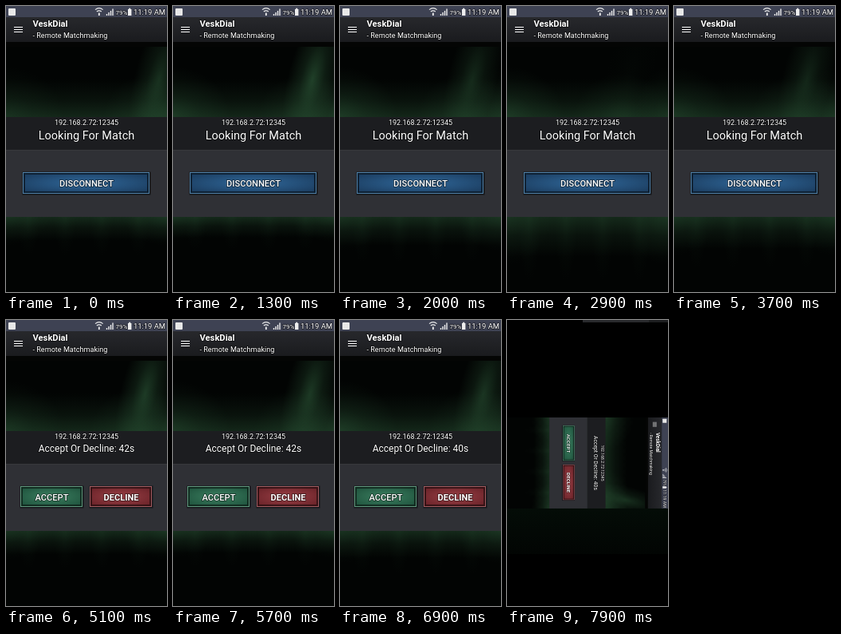
Animation, 202 px wide and 358 px high, one loop 8 s. Source, as an HTML page with a canvas:

```html
<!DOCTYPE html>
<html lang="en">
<head>
<meta charset="utf-8">
<title>Remote matchmaking</title>
<style>
html, body { margin: 0; width: 100%; height: 100%; overflow: hidden; background: #000; }
#stage { position: relative; width: 202px; height: 358px; overflow: hidden; background: #000; }
#phone { position: absolute; left: 0; top: 0; width: 202px; height: 358px; transform-origin: 0 0; background: #000; }
#phone > * { position: absolute; left: 0; top: 0; display: block; }
#phone.turned { transform: matrix(0, .564, -.564, 0, 202, 122); }
#rest { position: absolute; inset: 0; display: none; }
#rest.on { display: block; }
#rest i { position: absolute; }
text {
  font-family: Roboto, "Liberation Sans", sans-serif; fill: #fff;
  stroke: rgba(0, 0, 0, .55); stroke-width: 1.6px; paint-order: stroke;
}
.mid { text-anchor: middle; }
.label { font-size: 11.1px; font-weight: 500; text-anchor: middle; }
</style>
</head>
<body>
<div id="stage">
  <div id="rest">
    <i style="left:95px;top:0;width:83px;height:3px;background:#292a2d"></i>
    <i style="left:178px;top:0;width:24px;height:3px;background:#1d1e20"></i>
    <i style="left:0;top:201px;width:1px;height:90px;background:#1a1d1b"></i>
    <i style="left:0;top:236px;width:202px;height:57px;background:linear-gradient(#040c07,#020503)"></i>
  </div>
  <div id="phone">
    <canvas id="glow" width="202" height="358"></canvas>
    <svg width="202" height="358" viewBox="0 0 202 358">
      <defs>
        <linearGradient id="bar" x2="0" y2="1">
          <stop stop-color="#27282c"/><stop offset="1" stop-color="#1a1b1e"/>
        </linearGradient>
        <radialGradient id="blue" r=".6">
          <stop stop-color="#2f6799"/><stop offset="1" stop-color="#1d4064"/>
        </radialGradient>
        <radialGradient id="green" r=".65">
          <stop stop-color="#3b7f60"/><stop offset="1" stop-color="#20543e"/>
        </radialGradient>
        <radialGradient id="red" r=".65">
          <stop stop-color="#9a3f45"/><stop offset="1" stop-color="#6a2329"/>
        </radialGradient>
      </defs>

      <rect width="202" height="14" fill="#3e4253"/>
      <rect x="3" y="3" width="9" height="9" rx="1" fill="#e8e8e8"/>
      <g fill="none" stroke="#eee" stroke-width="1.2">
        <path d="M112 4.6q4.8-4 9.6 0M113.8 7q3-2.4 6 0"/>
        <path d="M116.8 8.5v3.5" stroke-width="1.8"/>
        <path d="M126.5 12v-2M129 12V8M131.5 12V6M134 12V3.5" stroke-width="1.4"/>
      </g>
      <text x="137.5" y="10.6" font-size="8">79%</text>
      <path d="M153 4h1.2V2.8h2V4h1.2v8H153z" fill="#eee"/>
      <text x="160" y="11" font-size="9.4">11:19 AM</text>

      <rect y="14" width="202" height="31" fill="url(#bar)"/>
      <rect y="45" width="202" height="6" fill="#040504"/>
      <path d="M10 26.5h11M10 29.5h11M10 32.5h11" stroke="#fff" stroke-width="1.1"/>
      <text x="33.5" y="26" font-size="11.2" font-weight="700">VeskDial</text>
      <text x="33.5" y="40" font-size="9.1">- Remote Matchmaking</text>

      <rect y="139" width="202" height="41" fill="#1c1d20"/>
      <rect y="180" width="202" height="84" fill="#2f3035"/>
      <rect y="180" width="202" height="1" fill="#37383c"/>
      <text class="mid" x="101" y="149" font-size="9">192.168.2.72:12345</text>
      <text class="mid" id="status" x="101" y="167"></text>
      <g id="search"></g>
      <g id="found"></g>
    </svg>
  </div>
</div>
<script>
const LOOP = 8000, MATCH = 4800, TURN = 7800;
const GREEN = "44,88,56";
const $ = id => document.getElementById(id);
const ctx = $("glow").getContext("2d");

function button(x, w, h, fill, edge, label, weight = 500) {
  const y = 208;
  return `<rect x="${x - .5}" y="${y - .5}" width="${w + 1}" height="${h + 1}" fill="#15171b"/>
    <rect x="${x}" y="${y}" width="${w - 1}" height="${h - 1}" fill="${edge}"/>
    <rect x="${x + 1}" y="${y + 1}" width="${w - 3}" height="${h - 3}" fill="url(#${fill})"/>
    <rect x="${x + 2}" y="${y + 2}" width="${w - 5}" height="${h - 5}" fill="none"
      stroke="#000" stroke-opacity=".5" stroke-width="2"/>
    <text class="label" x="${x + w / 2}" y="226" style="font-weight:${weight}">${label}</text>`;
}
$("search").innerHTML = button(21, 160, 28, "blue", "#4f80a8", "DISCONNECT");
$("found").innerHTML = button(18, 79, 27, "green", "#5f967b", "ACCEPT")
  + button(105, 79, 27, "red", "#a05b60", "DECLINE", 700);

// time, beam x, beam strength, left strength, depth of the lower glow
const lights = [
  [0,    184, .50, .25, 30],
  [1300, 167, .70, .42, 26],
  [2900, 145, .04, .40, 50],
  [4400, 170, .66, .30, 32],
  [5700, 164, .62, .36, 28],
  [6900, 172, .56, .42, 34],
  [8000, 176, .50, .34, 34]
];

function lightsAt(t) {
  let i = 0;
  while (i < lights.length - 2 && t >= lights[i + 1][0]) i++;
  const a = lights[i], b = lights[i + 1];
  const k = (t - a[0]) / (b[0] - a[0]), e = k * k * (3 - 2 * k);
  return a.map((v, n) => v + (b[n] - v) * e).slice(1);
}

function fade(g, alpha) {
  g.addColorStop(0, `rgba(${GREEN},${alpha})`);
  g.addColorStop(.45, `rgba(${GREEN},${alpha * .4})`);
  g.addColorStop(1, `rgba(${GREEN},0)`);
  ctx.fillStyle = g;
}

function blob(x, y, rx, ry, skew, alpha) {
  ctx.save();
  ctx.transform(rx, 0, skew * ry, ry, x, y);
  fade(ctx.createRadialGradient(0, 0, 0, 0, 0, 1), alpha);
  ctx.fillRect(-1, -1, 2, 2);
  ctx.restore();
}

function band(from, to, alpha) {
  fade(ctx.createLinearGradient(0, from, 0, to), alpha);
  ctx.fillRect(0, Math.min(from, to), 202, Math.abs(to - from));
}

function drawGlow(t) {
  const [x, beam, left, depth] = lightsAt(t);
  ctx.fillStyle = "#020403";
  ctx.fillRect(0, 0, 202, 358);
  // upper window: low band, rising sides and a leaning beam
  band(140, 92, .42);
  blob(0, 138, 72, 62, 0, left);
  blob(x, 142, 62, 58, 0, .3);
  blob(x + 8, 92, 32, 95, -.22, beam);
  blob(202, 138, 40, 62, 0, .25);
  // lower window: band with brighter corners and faint rays
  band(264, 264 + depth, .44);
  blob(0, 264, 55, depth * 1.2, 0, .2);
  blob(202, 264, 55, depth * 1.2, 0, .25);
  for (let n = 0; n < 4; n++) blob(28 + n * 46, 264, 14, depth * 1.6, 0, .12);
}

function show(id, on) { $(id).style.display = on ? "" : "none"; }

function draw(now) {
  const t = Math.floor(now % LOOP / 100) * 100;
  const found = t >= MATCH, turned = t >= TURN;
  const left = Math.max(40, 42 - Math.floor((t - MATCH) / 1000));
  const status = $("status");
  drawGlow(t);
  status.textContent = found ? `Accept Or Decline: ${left}s` : "Looking For Match";
  status.setAttribute("font-size", found ? 12 : 14.5);
  status.setAttribute("y", found ? 164.5 : 167);
  show("search", !found);
  show("found", found);
  $("phone").classList.toggle("turned", turned);
  $("rest").classList.toggle("on", turned);
}

const start = performance.now();
function tick() {
  draw(performance.now() - start);
  requestAnimationFrame(tick);
}
tick();
</script>
</body>
</html>
```
